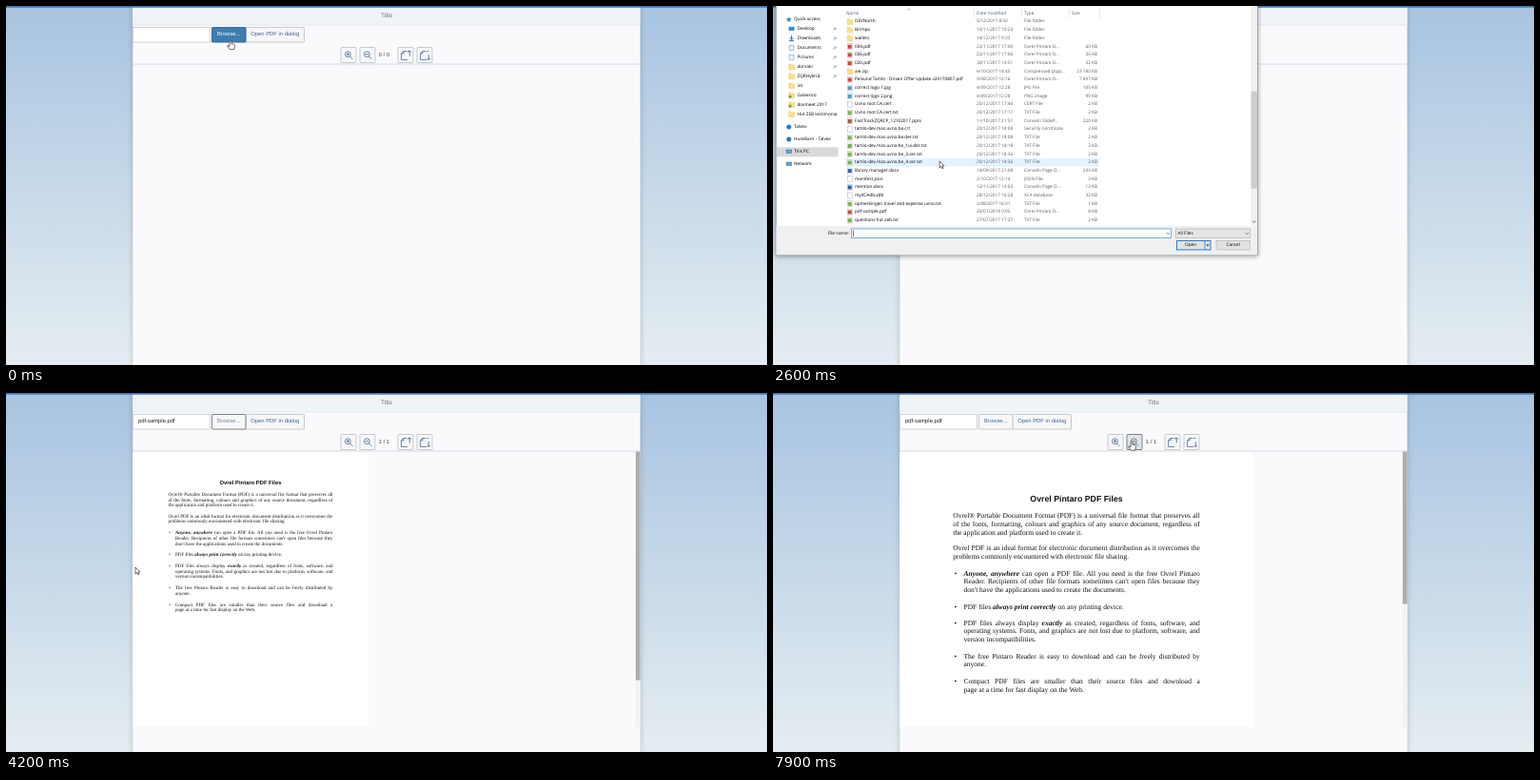
These frames come from a looping animation (800 by 377 pixels, 8 s). An HTML page:

```html
<!DOCTYPE html>
<html lang="en">
<head>
<meta charset="utf-8">
<title>PDF viewer demo</title>
<style>
html, body { margin: 0; width: 100%; height: 100%; overflow: hidden; }
svg { display: block; text-rendering: geometricPrecision; }
text { dominant-baseline: central; white-space: pre; }
.app { font: 5.85px "Liberation Sans", Arial, sans-serif; }
.dlg { font: 4.7px "Open Sans", "Noto Sans", sans-serif; fill: #000; }
.end { text-anchor: end; }
.mid { text-anchor: middle; }
.page { position: relative; font: 12px/13.9px "Liberation Serif", Times, serif; color: #111; }
.page div { position: absolute; right: 90px; }
.page h1 { position: absolute; left: 0; width: 595px; top: 72px; margin: 0; text-align: center;
  font: bold 14px/16px "Liberation Sans", Arial, sans-serif; }
.page b { font-style: italic; }
.page .full { text-align: justify; text-align-last: justify; }
</style>
</head>
<body>
<svg id="stage" width="800" height="377" viewBox="0 0 800 377">
  <defs>
    <linearGradient id="sky" x2="0" y2="1">
      <stop stop-color="#a8c4e1"/><stop offset="1" stop-color="#e5edf1"/>
    </linearGradient>
  </defs>
  <rect width="800" height="377" fill="url(#sky)"/>
  <rect x="133.3" width="533.4" height="380" fill="#fafafc" style="filter:drop-shadow(0 0 3px #0003)"/>
  <rect x="133.3" width="533.4" height="20" fill="#eff4f8"/>
  <path d="M133.3 20h533.4" stroke="#e3e8ec"/>
  <path d="M133.3 61h533.4" stroke="#d3dbe0"/>
  <rect width="800" height="1.7" fill="#3f7ab0"/>
  <g id="scene"></g>
</svg>
<script>
const LOOP = 8000, TICK = 100, ROW = 8.69;
const OPEN = 400, CLOSE = 3900, LOADED = 4100;

// [time, x, y] of the pointer tip
const POINTER = [[0, 236, 36], [300, 236, 36], [400, 232, 60], [700, 222, 84], [900, 216, 98],
  [1100, 208, 112], [2000, 183, 155], [2100, 183, 155], [2800, 172, 166], [3100, 137, 186.6], [3400, 137, 186.6],
  [3600, 136, 183], [4200, 136, 183], [5000, 284, 34], [5500, 291, 36], [5700, 300, 42],
  [6200, 360, 51], [7200, 360, 51], [7500, 377, 50.5], [8000, 377, 50.5]];
const SCROLL = [[0, 0], [1000, 0], [2000, 99.1], [2200, 99.1], [2800, 203.4]];
const ZOOM = [[0, 1], [6500, 1.25], [6800, 1.5], [7200, 1.75], [7800, 1.5]];

const TYPES = { pdf: 'Ovrel Pintaro D...', zip: 'Compressed (zipp...', jpg: 'JPG File', png: 'PNG image',
  cert: 'CERT File', txt: 'TXT File', pptx: 'Corvalin SlideP...', crt: 'Security Certificate',
  docx: 'Corvalin Page D...', json: 'JSON File', xdb: 'XCA database', pem: 'Privacy Enhanced ...' };
const COLORS = { pdf: '#d8453a', txt: '#7db344', jpg: '#4f9bd0', png: '#4f9bd0', docx: '#2f62ad', pptx: '#cf4b2c' };

// name|date|size in KB
const FILES = `ABAP Server|2/11/2017 12:11
aie|6/10/2017 13:16
babel|25/11/2017 16:26
backup|10/08/2017 7:36
backup code expense|9/08/2017 13:23
Quondria Studio|10/09/2017 23:04
cloudfoundry|4/10/2017 7:52
Custom Office Templates|24/07/2017 16:46
Uvno|20/12/2017 8:54
Huis|15/10/2017 21:04
i18n approval|18/12/2017 17:07
i18n request|18/12/2017 17:07
iot|19/01/2018 13:24
WZJ UIS Training|7/11/2017 22:27
My Received Files|23/11/2017 16:43
onkosten|20/12/2017 22:02
OpenZQR Certificaten 2017|6/12/2017 10:08
ZQR|18/07/2017 9:03
scp ft|12/10/2017 21:11
DEVNorth|5/12/2017 8:50
Brimpo|15/11/2017 10:23
wallets|14/12/2017 9:33
004.pdf|22/11/2017 17:00|60
006.pdf|22/11/2017 17:06|35
020.pdf|30/11/2017 13:51|52
aie.zip|6/10/2017 14:45|23 180
Pelvund Tamlo - Drixen Offer Update v20170807.pdf|9/08/2017 12:16|7 897
correct logo 1.jpg|4/09/2017 12:28|105
correct logo 2.png|4/09/2017 12:28|99
Uvno root CA.cert|20/12/2017 17:44|2
Uvno root CA.cert.txt|20/12/2017 17:17|2
FastTrackZQRCP_12102017.pptx|11/10/2017 21:51|220
tamlo-dev.mas.uvno.be.crt|20/12/2017 18:08|2
tamlo-dev.mas.uvno.be.der.txt|20/12/2017 18:08|2
tamlo-dev.mas.uvno.be_1ui.der.txt|20/12/2017 18:18|2
tamlo-dev.mas.uvno.be_3.cer.txt|20/12/2017 18:36|2
tamlo-dev.mas.uvno.be_4.cer.txt|20/12/2017 18:36|2
library manager.docx|14/09/2017 21:08|235
manifest.json|2/10/2017 12:14|3
mention.docx|12/11/2017 13:03|13
myXCAdb.xdb|28/12/2017 16:28|32
opmerkingen travel and expense uvno.txt|2/08/2017 16:31|1
pdf-sample.pdf|20/01/2018 0:05|8
questions hut zeb.txt|27/07/2017 17:37|2
scc_ca_csr (3).pem|6/12/2017 18:03|2
scc_ui_csr.pem|6/12/2017 17:36|2
template.txt|18/09/2017 15:43|1
burblet.txt|3/09/2017 17:36|1`.split('\n').map(l => l.split('|'));
const PICKED = FILES.findIndex(f => f[0] === 'pdf-sample.pdf');

const PINNED = ['Desktop', 'Downloads', 'Documents', 'Pictures', 'dorvaki', 'ZQRHybrid'];
const FOLDERS = ['iot', 'Galvenzo', 'dovmeet 2017', 'Hut ZEB testimonia'];
const ROOTS = ['Talvex', 'HuskBarn - Talvex', 'This PC', 'Network'];

const DOC = `Ovrel® Portable Document Format (PDF) is a universal file format that preserves all
of the fonts, formatting, colours and graphics of any source document, regardless of
the application and platform used to create it.

Ovrel PDF is an ideal format for electronic document distribution as it overcomes the
problems commonly encountered with electronic file sharing.

*<b>Anyone, anywhere</b> can open a PDF file. All you need is the free Ovrel Pintaro
*Reader. Recipients of other file formats sometimes can't open files because they
*don't have the applications used to create the documents.

*PDF files <b>always print correctly</b> on any printing device.

*PDF files always display <b>exactly</b> as created, regardless of fonts, software, and
*operating systems. Fonts, and graphics are not lost due to platform, software, and
*version incompatibilities.

*The free Pintaro Reader is easy to download and can be freely distributed by
*anyone.

*Compact PDF files are smaller than their source files and download a
*page at a time for fast display on the Web.`.split('\n');

const between = (t, a, b) => t >= a && t < b;
const lastKey = (keys, t) => keys.findLastIndex(k => k[0] <= t);
function ease(keys, t) {
  const i = lastKey(keys, t), a = keys[i], b = keys[i + 1];
  return a.slice(1).map((v, j) => b ? v + (b[j + 1] - v) * (t - a[0]) / (b[0] - a[0]) : v);
}

const text = (x, y, s, attr = '') => `<text x="${x}" y="${y}" ${attr}>${s}</text>`;
const rect = (x, y, w, h, fill, stroke = 'none', attr = '') =>
  `<rect x="${x}" y="${y}" width="${w}" height="${h}" fill="${fill}" stroke="${stroke}" ${attr}/>`;
const path = (d, stroke, fill = 'none', width = .8) =>
  `<path d="${d}" stroke="${stroke}" fill="${fill}" stroke-width="${width}"/>`;
const dot = (x, y, r, fill) => `<circle cx="${x}" cy="${y}" r="${r}" fill="${fill}"/>`;
const folder = (x, y) => path(`M${x} ${y - 2.8}h2.2l.7.9h2.8v4.8h-5.7z`, '#e8c25c', '#ffdf85', .4);

function fileIcon(x, y, ext) {
  if (!ext || ext === 'zip') return folder(x, y);
  return rect(x + .6, y - 3, 4.6, 6, '#fff', '#a9b4bd', 'stroke-width=".5"')
    + (COLORS[ext] ? rect(x + .7, y - 1.8, 4, 4, COLORS[ext]) : '');
}

const ICONS = {
  zoomIn: c => lens(c) + path('M5.7 7.2h3.4M7.4 5.5v3.4', c),
  zoomOut: c => lens(c) + path('M5.7 7.2h3.4', c),
  prev: c => sheet(c) + path('M12.3 9V3.4M10.6 5.1l1.7-1.7 1.7 1.7', c),
  next: c => sheet(c) + path('M12.3 7.5v5.6M10.6 11.4l1.7 1.7 1.7-1.7', c)
};
const lens = c => path('M10.3 7.2a2.9 2.9 0 1 0-5.8 0a2.9 2.9 0 1 0 5.8 0M9.5 9.3l2.9 3', c);
const sheet = c => path('M9.3 4H6L3.6 6.3v6.6h6.6M6 4v2.3H3.6M12.3 4h-2', c);

function button(x, y, w, h, label, mouse, { active, focus } = {}) {
  const over = mouse && between(mouse[0], x, x + w) && between(mouse[1], y, y + h);
  const fill = active ? '#3f7cb0' : over ? '#e2e4e6' : '#f7f7f8';
  const edge = active ? '#356b9b' : over || focus ? '#7c8186' : '#c6cacd';
  const ink = active ? '#fff' : focus ? '#7288a6' : '#3f6795';
  const face = ICONS[label] ? `<g transform="translate(${x} ${y})">${ICONS[label](ink)}</g>`
    : text(x + w / 2, y + h / 2, label, `class="mid" fill="${ink}"`);
  return rect(x, y, w, h, fill, edge, 'rx=".6"') + face;
}

function page(scale) {
  const lines = DOC.map((raw, i) => {
    if (!raw) return '';
    const item = raw[0] === '*', full = DOC[i + 1] ? 'full' : '';
    const top = 101.7 + i * 13.9;
    const bullet = item && !DOC[i - 1] ? `<div style="left:92px;top:${top}px">•</div>` : '';
    return `${bullet}<div class="${full}" style="left:${item ? 108 : 90}px;top:${top}px">${raw.slice(item)}</div>`;
  }).join('');
  return `<svg x="133" y="62" width="534" height="288.5"><g transform="translate(0 -1) scale(${scale * 248 / 595})">
    ${rect(0, 0, 595, 842, '#fff')}
    <foreignObject width="595" height="842"><div class="page" style="width:595px;height:842px">
    <h1>Ovrel Pintaro PDF Files</h1>${lines}</div></foreignObject></g></svg>`
    + rect(661.5, 61.5, 5.5, 289, '#f3f3f4') + rect(662, 61.5, 4.7, 240 / scale, '#adadaf');
}

function app(t, mouse) {
  const loaded = t >= LOADED;
  const zoomIn = between(t, 6400, 6500) || between(t, 6700, 6800) || between(t, 7000, 7200);
  return `<g class="app">`
    + text(400, 10, 'Title', 'class="mid" fill="#70757a" font-size="6.6"')
    + rect(133.5, 22.5, 81, 15.5, '#fff', '#cfd3d6')
    + (t >= CLOSE ? text(139, 30, 'pdf-sample.pdf', 'fill="#222"') : '')
    + button(252, 22.5, 61.5, 15.5, 'Open PDF in dialog', mouse)
    + button(216.5, 22.5, 35.5, 15.5, 'Browse...', mouse, { active: t < 100, focus: t < 6400 })
    + button(352, 43.5, 16, 16, 'zoomIn', mouse, { active: zoomIn })
    + button(372, 43.5, 16, 16, 'zoomOut', mouse, { active: between(t, 7700, 7800) })
    + text(397.5, 51.5, loaded ? '1 / 1' : '0 / 0', 'class="mid" fill="#444"')
    + button(412, 43.5, 16, 16, 'prev', mouse)
    + button(432, 43.5, 16, 16, 'next', mouse)
    + (loaded ? page(ZOOM[lastKey(ZOOM, t)][1]) : '') + '</g>';
}

function sidebar() {
  const pin = y => path(`M63.5 ${y + 1.5}l1.5-1.5m-.8-1l1.8 1.8m-.9-2.4l1.6 1.6`, '#777', 'none', .7);
  const subs = [...PINNED, ...FOLDERS].map((name, i) => {
    const y = 24 + i * 9.95;
    const icon = i === 0 ? rect(16.5, y - 2.2, 6, 4, '#2d8fd5')
      : i === 1 ? path(`M19.5 ${y - 3}v4.5m-2-2l2 2 2-2M17 ${y + 2.6}h5`, '#2878c0', 'none', 1)
      : i < 4 ? rect(17, y - 2.6, 5, 5.2, '#e9f2f8', '#7fa6c2', 'stroke-width=".6"') : folder(16.7, y);
    return icon + (between(i, 7, 9) ? dot(18, y + 1.5, 1.6, '#5fae3c') : '')
      + text(25.5, y, name) + (i < PINNED.length ? pin(y) : '');
  }).join('');
  const roots = ROOTS.map((name, i) => {
    const y = 127 + i * 13;
    const icon = i < 2 ? dot(16.7, y, 2.5, '#2479c4') : rect(14, y - 2, 5.5, 3.6, '#55a9dc', '#4a6478', 'stroke-width=".5"');
    return icon + text(22, y, name);
  }).join('');
  return rect(4, 148.3, 64.5, 10, '#d9d9d9')
    + path('M16.7 11.2l.9 1.9 2 .2-1.5 1.4.4 2-1.8-1-1.8 1 .4-2-1.5-1.4 2-.2z', 'none', '#2f8ad2')
    + text(22, 14, 'Quick access') + subs + roots;
}

function fileList(t, scroll, mouse) {
  const rows = FILES.map(([name, date, size], i) => {
    const y = 20 + i * ROW - scroll, top = y - ROW / 2;
    if (y < 5 || y > 240) return '';
    const ext = size && name.split('.').pop();
    const chosen = i === PICKED && t >= 3700;
    const fill = chosen ? '#cce8ff' : between(mouse[1], top, top + ROW) ? '#e5f3ff' : 'none';
    return rect(76, top, 267, ROW, fill) + fileIcon(78, y, ext) + text(86, y, name)
      + `<g fill="#5c5c5c">` + text(214, y, date) + text(264, y, ext ? TYPES[ext] : 'File folder')
      + (size ? text(341, y, size + ' KB', 'class="end"') : '') + '</g>';
  }).join('');
  const heads = [[77, 'Name'], [214, 'Date modified'], [264, 'Type'], [314, 'Size']];
  return `<svg x="76" y="12.3" width="426" height="218" viewBox="76 12.3 426 218">${rows}</svg>`
    + heads.map(([x, s]) => text(x, 8, s, 'fill="#4c607a"')).join('')
    + path('M211.5 3v9M261.5 3v9M311.5 3v9M343.5 3v9', '#e2e2e2') + path('M141 4.3l1.6-1.6 1.6 1.6', '#777', 'none', .6)
    + rect(502.5, 0, 6.5, 230, '#f0f0f0') + rect(502.5, 10 + scroll * .472, 6.5, 102, '#cdcdcd')
    + path('M504 225.5l1.8 1.8 1.8-1.8', '#555');
}

function picker(t, scroll, mouse) {
  const chevron = (x, y) => path(`M${x} ${y}l1.7 1.7 1.7-1.7`, '#555', 'none', .7);
  const caret = Math.floor((t - OPEN) / 530) % 2 === 0;
  const tip = ['Type: TXT File', 'Size: 1,29 KB', 'Date modified: 27/07/2017 17:37'];
  return `<g class="dlg">`
    + rect(3.2, -5, 506.2, 266.6, '#fff', '#8d949a', 'stroke-width=".7" style="filter:drop-shadow(0 1px 2.5px #0006)"')
    + sidebar() + fileList(t, scroll, mouse)
    + rect(3.5, 231, 505.5, 30.3, '#f0f0f0')
    + text(57.5, 238.7, 'File name:')
    + rect(82.5, 234, 336, 9.5, '#fff', '#3c8fd6', 'stroke-width=".7"') + chevron(413.5, 238)
    + (t >= 3700 ? text(84.5, 238.7, 'pdf-sample.pdf') : caret ? path('M84.5 235.5v6.5', '#222', 'none', .6) : '')
    + rect(423.5, 234, 78, 9.5, '#e6e6e6', '#b4b4b4', 'stroke-width=".7"') + text(425.5, 238.7, 'All Files') + chevron(496.5, 238)
    + rect(424.5, 246.5, 35.5, 9.5, '#e2e2e2', '#2680cf') + path('M454 246.5v9.5', '#2680cf')
    + text(439, 251.2, 'Open', 'class="mid"') + path('M455.4 250.4h3.2l-1.6 1.9z', 'none', '#222')
    + rect(466, 246.5, 35.5, 9.5, '#e2e2e2', '#b4b4b4', 'stroke-width=".7"') + text(483.7, 251.2, 'Cancel', 'class="mid"')
    + (between(t, 3300, 3600) ? rect(142.5, 195, 75.5, 21.5, '#fff', '#777', 'stroke-width=".8" style="filter:drop-shadow(1px 1px 1px #0005)"')
      + tip.map((s, i) => text(144.5, 199.3 + i * 6.2, s, 'fill="#555"')).join('') : '')
    + '</g>';
}

function pointer([x, y], hand) {
  const d = hand ? 'M-.9.8Q0-.6.9.8V3.6l2.7.7q1 .4.9 1.5l-.7 3.8h-4.5l-2.6-3.4q-.2-1.3 1.2-.7l1.2 1z'
    : 'M0 0V7l1.6-1.5 1.1 2.5 1.1-.5-1.1-2.4h2.2z';
  return `<g transform="translate(${x} ${y})">${path(d, '#222', '#fff', .65)}</g>`;
}

function frame(t) {
  const mouse = ease(POINTER, t), dialog = between(t, OPEN, CLOSE);
  const [x, y] = mouse;
  const hand = !dialog && (between(y, 22, 38.5) && between(x, 216, 314)
    || between(y, 43, 60) && between(x, 352, 388));
  return app(t, dialog ? null : mouse)
    + (dialog ? picker(t, ease(SCROLL, t)[0], mouse) : '') + pointer(mouse, hand);
}

const scene = document.getElementById('scene');
let shown = -1;
function loop() {
  const t = Math.floor(performance.now() % LOOP / TICK) * TICK;
  if (t !== shown) scene.innerHTML = frame(shown = t);
  requestAnimationFrame(loop);
}
loop();
</script>
</body>
</html>
```
